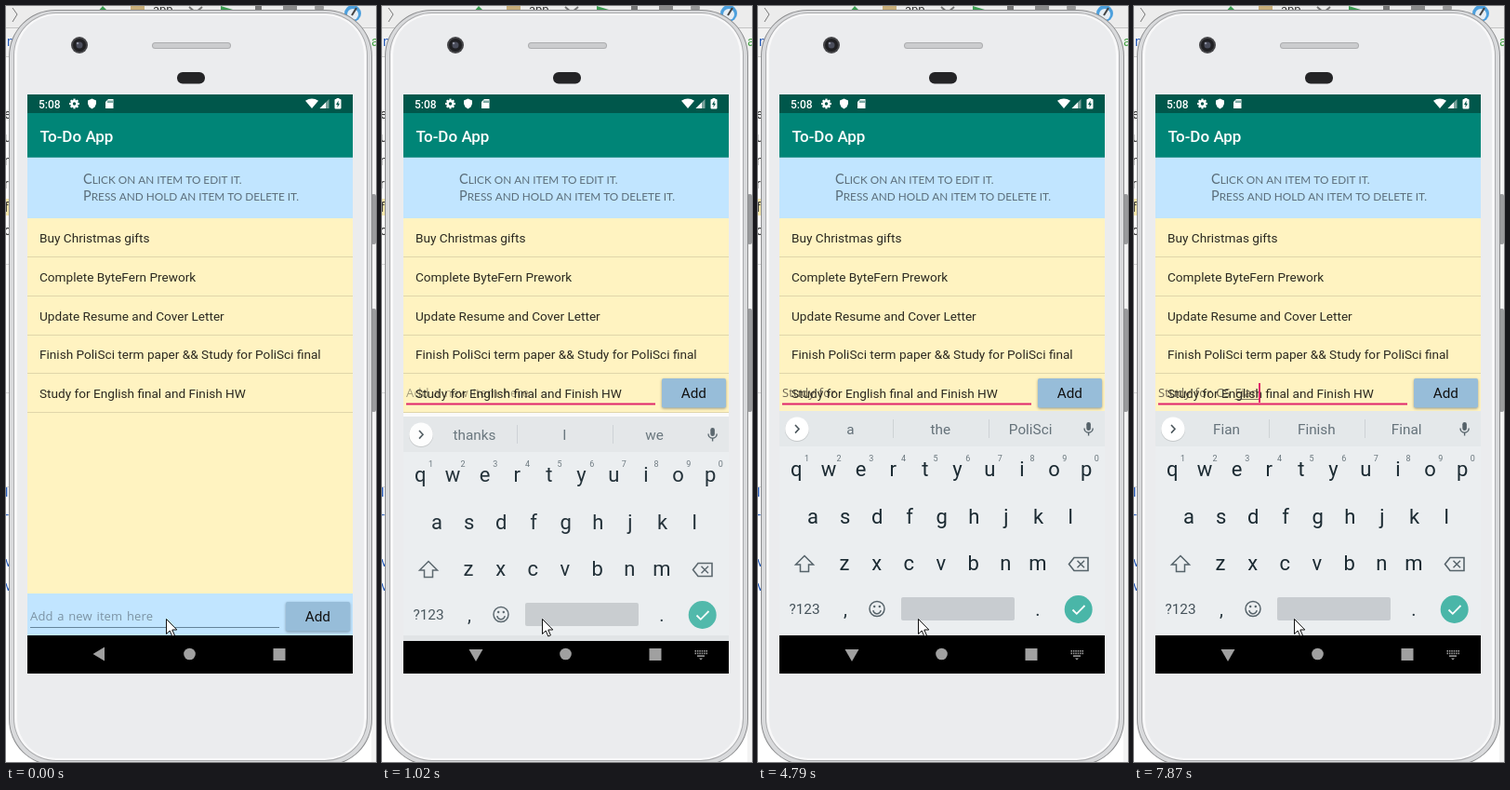
Animation, 398 px wide and 812 px high, one loop 8000 ms. Source, as an HTML page with a canvas:

```html
<!DOCTYPE html>
<html lang="en">
<head>
<meta charset="utf-8">
<title>To-Do App</title>
<style>
html, body { margin: 0; width: 100%; height: 100%; overflow: hidden; background: #fff; }
canvas { display: block; width: 398px; height: 812px; }
</style>
</head>
<body>
<canvas id="stage" width="398" height="812"></canvas>
<script>
const ctx = document.getElementById('stage').getContext('2d');
const LOOP = 8000;
const SANS = 'Roboto, sans-serif';
const INPUT_FONT = '13px "Open Sans", sans-serif';
const ITEMS = [
  'Buy Christmas gifts',
  'Complete ByteFern Prework',
  'Update Resume and Cover Letter',
  'Finish PoliSci term paper && Study for PoliSci final',
  'Study for English final and Finish HW'
];

// time, typed text, keyboard suggestions
const TYPING = [
  [0, '', 'thanks I we'],
  [2240, 'S', 'S So See'],
  [2670, 'St', 'St Still Start'],
  [2790, 'Stu', 'Stu Study Stuff'],
  [2910, 'Stud', 'Stud Study Student'],
  [3050, 'Study', 'Study Studying Studied'],
  [3200, 'Study ', 'Study Studying Studied'],
  [3320, 'Study ', 'I for to'],
  [3840, 'Study f', 'f for from'],
  [3960, 'Study fo', 'fo for follow'],
  [4240, 'Study for', 'for fork forward'],
  [4360, 'Study for ', 'a the PoliSci'],
  [5470, 'Study for C', 'C Can Call'],
  [5600, 'Study for CS', 'C Can Courses'],
  [5720, 'Study for CS', 'CS CSS CST'],
  [5990, 'Study for CS ', 'I and for'],
  [6390, 'Study for CS F', 'F For Fri'],
  [6510, 'Study for CS F', 'F For First'],
  [6660, 'Study for CS Fi', 'Fi Finish Final'],
  [6790, 'Study for CS Fia', 'Fi Finish Final'],
  [6940, 'Study for CS Fia', 'Fia Finish Final'],
  [7060, 'Study for CS Fian', 'Fian Finish Final']
];

// time, slide offset, opacity
const KEYBOARD = [[0, 240, 0], [770, 110, 0.08], [890, 60, 0.45], [1020, 6, 0.96], [1160, 1, 1], [1280, 0, 1]];

const CARET_ON = [[620, 770], [1280, 1810], [2240, 3690], [3840, 4790], [5320, 7340], [7870, LOOP]];

const at = (steps, t) => steps.filter(s => s[0] <= t).pop();

function rect(x, y, w, h, color) {
  ctx.fillStyle = color;
  ctx.fillRect(x, y, w, h);
}

function round(x, y, w, h, r, color) {
  ctx.fillStyle = color;
  ctx.beginPath();
  ctx.roundRect(x, y, w, h, r);
  ctx.fill();
}

function dot(x, y, r, color) {
  ctx.fillStyle = color;
  ctx.beginPath();
  ctx.arc(x, y, r, 0, Math.PI * 2);
  ctx.fill();
}

function trace(points) {
  ctx.beginPath();
  points.forEach(([x, y], i) => i ? ctx.lineTo(x, y) : ctx.moveTo(x, y));
}

function poly(points, color) {
  trace(points);
  ctx.closePath();
  ctx.fillStyle = color;
  ctx.fill();
}

function line(points, color, width = 1, closed = false) {
  trace(points);
  if (closed) ctx.closePath();
  ctx.strokeStyle = color;
  ctx.lineWidth = width;
  ctx.stroke();
}

function text(str, x, y, font, color, align = 'left') {
  ctx.font = font;
  ctx.fillStyle = color;
  ctx.textAlign = align;
  ctx.fillText(str, x, y);
}

function drawDesktop() {
  rect(0, 0, 398, 812, '#fff');
  rect(0, 0, 398, 24, '#ececec');
  rect(0, 23, 398, 1, '#c4c4c4');
  rect(0, 24, 398, 30, '#f1f1f1');
  rect(0, 54, 398, 1, '#cfcfcf');
  line([[7, 2], [12, 9], [7, 17]], '#777');
  text('n', 1, 43, '14px ' + SANS, '#2459b8');
  poly([[98, 7], [104, 0], [111, 7]], '#3c9e52');
  rect(134, 0, 15, 7, '#c8ad78');
  text('app', 158, 8, '13px ' + SANS, '#333');
  line([[197, 1], [204, 7], [211, 1]], '#777', 2);
  poly([[231, 0], [244, 4], [231, 8]], '#3c9e52');
  rect(268, 0, 7, 7, '#777');
  rect(298, 0, 15, 6, '#8a8a8a');
  dot(337, 2, 5, '#999');
  dot(373, 8, 9, '#4da0dd');
  dot(373, 9, 6, '#e7eef4');
  line([[372, 10], [377, 2]], '#444', 2);
  rect(0, 207, 5, 18, '#f7e9ac');
  [...'eunrfc'].forEach((c, i) => text(c, -2, 121 + i * 25, '14px ' + SANS, '#333'));
  [['l', 527], ['-', 551], ['v', 602], ['v', 628]].forEach(([c, y]) =>
    text(c, -1, y, '14px ' + SANS, '#2459b8'));
  rect(0, 277, 4, 1, '#d8d8d8');
  rect(0, 415, 4, 1, '#d8d8d8');
  rect(0, 516, 4, 1, '#d8d8d8');
  text('a', 393, 43, '14px ' + SANS, '#47a447');
  rect(393, 54, 5, 758, '#f3f3f3');
}

function drawPhone() {
  round(393, 202, 5, 54, 2, '#9a9b9d');
  round(393, 325, 5, 111, 2, '#9a9b9d');
  round(3, 4, 391, 812, 50, '#8c8d8f');
  round(4, 5, 389, 810, 49, '#d9dadc');
  round(8, 7, 381, 804, 46, '#aaabad');
  round(9, 8, 379, 802, 45, '#f8f8f9');
  round(12, 10, 373, 798, 42, '#ebecee');

  dot(79, 42, 9, '#454548');
  dot(79, 42, 7, '#202023');
  dot(79, 42, 3.5, '#4a4d5b');
  dot(77, 40, 1.3, '#8d90a0');
  round(157, 39, 85, 7, 3.5, '#acadaf');
  round(158, 40, 83, 5, 2.5, '#cbccce');
  round(184, 71, 30, 12.5, 6, '#242426');
}

function drawStatusBar() {
  rect(23, 95, 350, 20, '#00574b');
  text('5:08', 35, 109.5, '500 12px ' + SANS, '#fff');

  for (let i = 0; i < 8; i++) {
    const a = i * Math.PI / 4;
    line([[73.5, 105], [73.5 + 5.4 * Math.cos(a), 105 + 5.4 * Math.sin(a)]], '#fff', 2.2);
  }
  dot(73.5, 105, 4, '#fff');
  dot(73.5, 105, 1.7, '#00574b');
  poly([[92.5, 99.5], [97, 101.5], [97, 105], [95.5, 108.5], [92.5, 110.5], [89.5, 108.5], [88, 105], [88, 101.5]], '#fff');
  poly([[110, 100], [115.5, 100], [115.5, 110], [107, 110], [107, 103]], '#fff');
  [109.5, 111.5, 113.5].forEach(x => rect(x, 101.5, 1, 2.5, '#00574b'));

  ctx.fillStyle = '#fff';
  ctx.beginPath();
  ctx.moveTo(329, 110);
  ctx.lineTo(322, 101.8);
  ctx.quadraticCurveTo(329, 97.2, 336, 101.8);
  ctx.fill();
  poly([[337.5, 110], [347.5, 100], [347.5, 110]], '#7aa39c');
  poly([[337.5, 110], [344, 103.5], [344, 110]], '#fff');
  rect(355.5, 99, 3, 2, '#fff');
  round(353.5, 100, 7, 10.5, 1, '#fff');
  poly([[357.6, 101.5], [355, 106], [356.7, 106], [356.4, 109], [359, 104.7], [357.4, 104.7]], '#00574b');
}

function smallCaps(str, x, y) {
  const color = '#5b6e7b';
  text(str[0], x, y, '14.5px Lato, sans-serif', color);
  const w = ctx.measureText(str[0]).width;
  text(str.slice(1).toUpperCase(), x + w, y, '11.8px Lato, sans-serif', color);
}

function drawApp(keyboardOpen) {
  rect(23, 95, 350, 622, '#fafafa');
  drawStatusBar();
  rect(23, 115, 350, 48, '#008577');
  text('To-Do App', 36.5, 145.5, '500 17px ' + SANS, '#fff');
  rect(23, 163, 350, 65, '#c1e5ff');
  rect(23, 162, 350, 1, '#3d9d9a');
  smallCaps('Click on an item to edit it.', 83, 191);
  smallCaps('Press and hold an item to delete it.', 83, 209);

  rect(23, 228, 350, keyboardOpen ? 208 : 403, '#fff3c1');
  ITEMS.forEach((item, i) => {
    const y = 228 + i * 41.8;
    text(item, 36, y + 26, '13.62px ' + SANS, '#2b2920');
    rect(23, Math.round(y + 41), 350, 1, '#e0d6aa');
  });
}

function drawInput(t, typed, keyboardOpen) {
  ctx.save();
  if (keyboardOpen) ctx.translate(0, -240);
  else rect(23, 631, 350, 45, '#c1e5ff');

  ctx.shadowColor = 'rgba(0,0,0,.35)';
  ctx.shadowBlur = 3;
  ctx.shadowOffsetY = 1;
  round(301, 640, 69, 31.5, 2, '#97bdd9');
  ctx.shadowColor = 'transparent';
  text('Add', 335.3, 661, '15.3px ' + SANS, '#111', 'center');

  if (t < 620) rect(26, 667, 268, 1, '#64849a');
  if (t >= 620) rect(26, 666.5, 268, 2, '#e0266b');
  else if (t >= 500) rect(90, 666.5, 150, 2, '#e0266b');

  ctx.letterSpacing = '0.15px';
  ctx.wordSpacing = '1.1px';
  text(typed || 'Add a new item here', 26, 660, INPUT_FONT, typed ? 'rgba(50,45,40,.72)' : 'rgba(0,0,0,.36)');
  const width = typed ? ctx.measureText(typed).width : 0;
  const wordStart = typed.lastIndexOf(' ') + 1;
  if (wordStart < typed.length) {
    const from = ctx.measureText(typed.slice(0, wordStart)).width;
    rect(26 + from, 662, width - from, 1, 'rgba(50,45,40,.6)');
  }
  ctx.letterSpacing = ctx.wordSpacing = '0px';
  if (CARET_ON.some(([a, b]) => t >= a && t < b)) rect(Math.round(26 + width), 645, 2, 21, '#e0266b');
  ctx.restore();
}

function drawKeyRow(letters, x, y) {
  [...letters].forEach((c, i) => text(c, x + i * 34.65, y, '22px ' + SANS, '#1b2a32', 'center'));
}

function drawKeyboard(suggestions) {
  const icon = '#56636a';
  rect(23, 435, 350, 241, '#ebeef0');
  rect(23, 435, 350, 38, '#e4e8ea');
  dot(42, 455, 13, 'rgba(0,0,0,.13)');
  dot(42, 454.3, 12.7, '#fff');
  line([[40, 450], [44, 454.3], [40, 458.6]], '#4b565c', 1.6);
  suggestions.split(' ').forEach((word, i) =>
    text(word, 99.5 + i * 96.8, 460, '15.3px ' + SANS, '#65727a', 'center'));
  rect(145, 444, 1, 20, '#cdd2d5');
  rect(248, 444, 1, 20, '#cdd2d5');

  round(353.3, 447, 4.6, 9, 2.3, icon);
  ctx.strokeStyle = icon;
  ctx.lineWidth = 1.4;
  ctx.beginPath();
  ctx.arc(355.6, 453.5, 4.6, 0, Math.PI);
  ctx.stroke();
  rect(354.9, 458, 1.4, 3.5, icon);

  drawKeyRow('qwertyuiop', 41.3, 505);
  drawKeyRow('asdfghjkl', 59, 555.5);
  drawKeyRow('zxcvbnm', 93, 606);
  [...'1234567890'].forEach((c, i) =>
    text(c, 52.5 + i * 34.65, 489, '9px ' + SANS, '#69767d', 'center'));

  line([[50, 590.5], [59.5, 600], [54.5, 600], [54.5, 607.5], [45.5, 607.5], [45.5, 600], [40.5, 600]], icon, 1.5, true);
  line([[334.5, 599.5], [340, 592.5], [355, 592.5], [355, 606.5], [340, 606.5]], icon, 1.6, true);
  line([[343.5, 595.8], [351, 603.3]], icon, 1.5);
  line([[351, 595.8], [343.5, 603.3]], icon, 1.5);

  text('?123', 50, 653, '15.4px ' + SANS, '#45525a', 'center');
  text(',', 94, 655, '20px ' + SANS, '#25343c', 'center');
  text('.', 301, 655, '20px ' + SANS, '#25343c', 'center');
  ctx.strokeStyle = icon;
  ctx.lineWidth = 1.5;
  ctx.beginPath();
  ctx.arc(128, 647.5, 8, 0, Math.PI * 2);
  ctx.stroke();
  dot(125.2, 645, 1.2, icon);
  dot(130.8, 645, 1.2, icon);
  ctx.beginPath();
  ctx.arc(128, 648.5, 4.2, 0.15, Math.PI - 0.15);
  ctx.stroke();
  round(154, 635, 122, 25, 2, '#c8ccd0');
  dot(344.7, 648, 15, '#4ab6a8');
  line([[338.5, 648.5], [342.8, 652.8], [351.5, 644]], '#fff', 1.8);
}

function drawNavIcons(keyboardOpen) {
  const gray = '#a0a0a0';
  if (keyboardOpen) {
    poly([[93.5, 691], [108.5, 691], [101, 704]], gray);
    for (let row = 0; row < 2; row++)
      for (let col = 0; col < 6; col++) rect(336.5 + col * 2.4, 692 + row * 2.6, 1.5, 1.6, gray);
    rect(339, 697.4, 8, 1.5, gray);
    poly([[341, 700.5], [345, 700.5], [343, 702.5]], gray);
  } else {
    poly([[93.5, 696], [106, 688.5], [106, 703.5]], gray);
  }
  dot(197.5, 696, 6.3, gray);
  rect(287.5, 690, 13, 13, gray);
}

function drawPointer() {
  const shape = [[172.5, 658.5], [172.5, 674.5], [176.2, 671], [178.8, 677], [181.4, 675.9], [178.8, 670], [183.8, 670]];
  poly(shape, '#fff');
  line(shape, '#111', 1, true);
}

function draw(t) {
  const keyboardOpen = t >= 770;
  const [, typed, suggestions] = at(TYPING, t);
  const [, slide, opacity] = at(KEYBOARD, t);

  drawDesktop();
  drawPhone();
  ctx.save();
  ctx.beginPath();
  ctx.rect(23, 95, 350, 622);
  ctx.clip();
  drawApp(keyboardOpen);
  drawInput(t, typed, keyboardOpen);
  rect(23, 676, 350, 41, '#000');
  if (keyboardOpen) {
    ctx.save();
    ctx.globalAlpha = opacity;
    ctx.translate(0, slide);
    drawKeyboard(suggestions);
    ctx.restore();
  }
  drawNavIcons(keyboardOpen);
  ctx.restore();
  drawPointer();
}

const start = performance.now();
function tick() {
  draw((performance.now() - start) % LOOP);
  requestAnimationFrame(tick);
}
tick();
</script>
</body>
</html>
```
